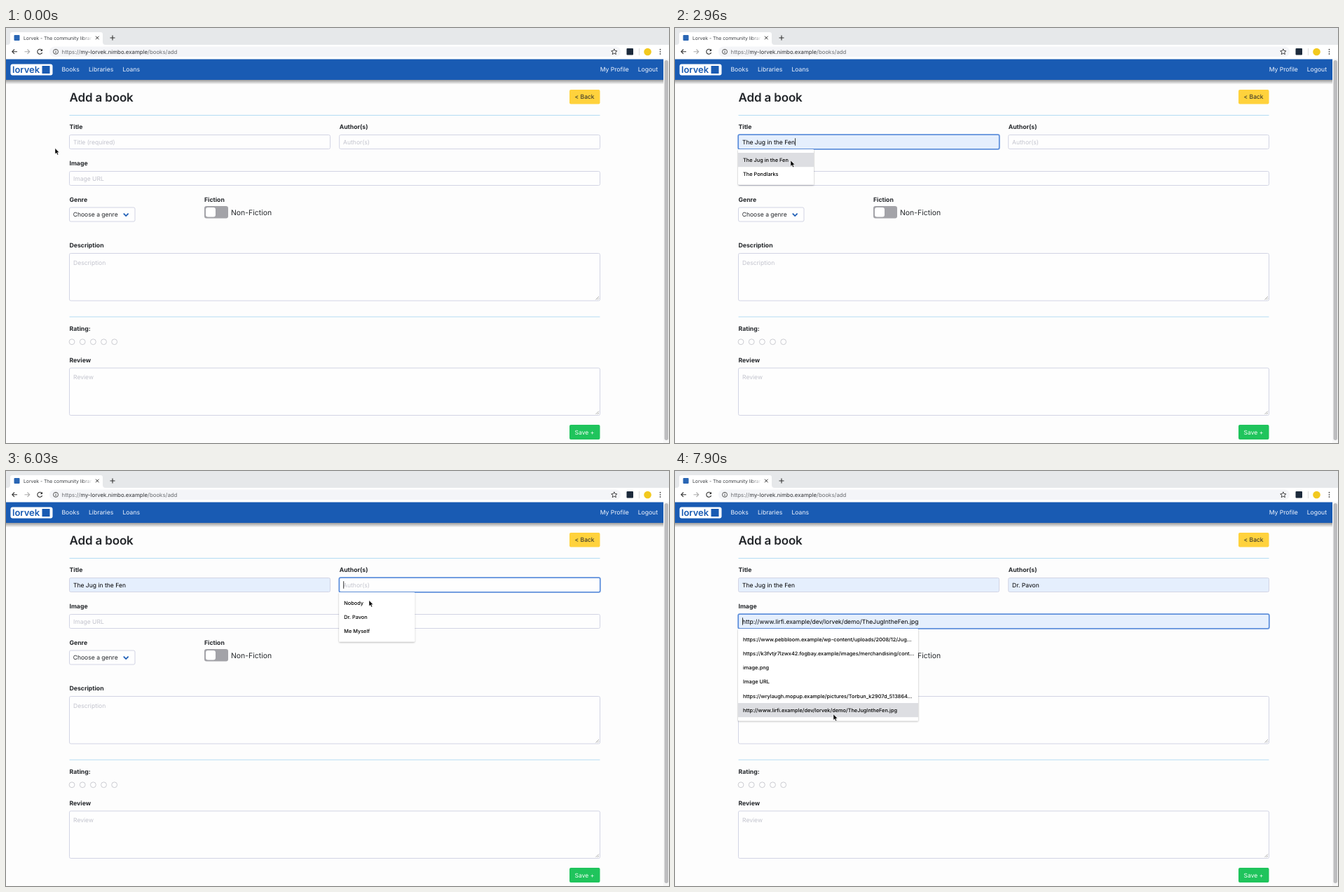
Recreate the animation shown at these times as an HTML page. Size 946 by 592 pixels, loop 8 s.

```html
<!DOCTYPE html>
<html lang="en">
<head>
<meta charset="utf-8">
<title>Add a book</title>
<style>
  html, body { margin: 0; width: 100%; height: 100%; overflow: hidden; background: #fdfdfd; }
  svg { display: block; width: 946px; height: 592px; }
  text { font-family: Inter, "Open Sans", sans-serif; text-rendering: geometricPrecision; white-space: pre; }
</style>
</head>
<body>
<svg id="stage" viewBox="0 0 946 592">
  <defs>
    <linearGradient id="fade"><stop offset="0" stop-color="#fff" stop-opacity="0"/><stop offset="1" stop-color="#fff"/></linearGradient>
    <linearGradient id="under" x2="0" y2="1"><stop offset="0" stop-opacity=".42"/><stop offset="1" stop-opacity="0"/></linearGradient>
    <filter id="lift" x="-10%" y="-10%" width="120%" height="125%">
      <feDropShadow dx="0" dy="1" stdDeviation="1.3" flood-opacity=".32"/>
    </filter>
  </defs>
  <g id="page"></g>
  <g id="live"></g>
</svg>
<script>
const LOOP = 8000;
const INK = '#24272b', HINT = '#c2c3cd', EDGE = '#d2d4e4', FOCUS = '#5f90dc', FILLED = '#e5effd', BLUE = '#195bb3';

const esc = s => s.replace(/&/g, '&amp;').replace(/</g, '&lt;');
const rect = (x, y, w, h, fill, r = 0, extra = '') =>
  `<rect x="${x}" y="${y}" width="${w}" height="${h}" rx="${r}" fill="${fill}" ${extra}/>`;
const text = (x, y, s, size = 8.55, fill = INK, weight = 400, extra = '') =>
  `<text x="${x}" y="${y}" font-size="${size}" fill="${fill}" font-weight="${weight}" ${extra}>${esc(s)}</text>`;
const path = (d, stroke, w = 1) => `<path d="${d}" fill="none" stroke="${stroke}" stroke-width="${w}"/>`;
const dot = (x, y, r, fill, extra = '') => `<circle cx="${x}" cy="${y}" r="${r}" fill="${fill}" ${extra}/>`;
const box = (x, y, w, h) => rect(x, y, w, h, '#fefefe', 2, `stroke="${EDGE}"`);
const label = (x, y, s) => text(x, y, s, 8.7, INK, 650);

function browser() {
  return rect(0, 0, 946, 24, '#e6e8ea') +
    '<path d="M2 24Q6 24 6 20V9Q6 6 9 6H135Q138 6 138 9V20Q138 24 142 24Z" fill="#fff"/>' +
    rect(11.5, 10, 8, 8, '#2a66b4', 1) +
    text(25, 16.6, 'Lorvek - The community librar', 6.8, '#3a3d41') + rect(108, 8, 16, 13, 'url(#fade)') +
    path('M128 11.7L132.6 16.3M132.6 11.7L128 16.3', '#333') +
    path('M148.5 14H155.5M152 10.5V17.5', '#333', 1.1) +
    rect(0, 24, 946, 20.5, '#fff') + rect(62, 26.5, 815, 14.5, '#f4f5f8', 7.2) +
    path('M16 33.7H9M12 30.5L8.8 33.7L12 36.9', '#333', 1.1) +
    path('M26.5 33.7H33.5M30.5 30.5L33.7 33.7L30.5 36.9', '#aaa', 1.1) +
    path('M51 31.5A3.5 3.5 0 1 0 51.6 35', '#333', 1.1) + '<path d="M52 29.8V33H48.8Z" fill="#333"/>' +
    dot(71, 33.8, 3.5, 'none', 'stroke="#444" stroke-width=".9"') + path('M71 33.2V35.9M71 31.6V32.5', '#444', .9) +
    '<text x="79.5" y="36.6" font-size="7.85" fill="#6a6d71">https://<tspan fill="#303236">my-lorvek.nimbo.example</tspan>/books/add</text>' +
    path('M867.8 29.8L869 32.5L871.9 32.8L869.7 34.7L870.4 37.6L867.8 36.1L865.2 37.6L865.9 34.7L863.7 32.8L866.6 32.5Z', '#333', .9) +
    rect(885.5, 29, 9.5, 9.5, '#1d2b3c', 1) + path('M903.5 29V39', '#ddd') +
    dot(915.5, 34, 5.3, '#f2c91f') +
    [30.7, 33.8, 36.9].map(y => dot(933.5, y, .9, '#444')).join('');
}

function page() {
  const links = [[79.5, 'Books'], [118, 'Libraries'], [166.5, 'Loans'], [847.7, 'My Profile'], [901.7, 'Logout']];
  const area = (y, hint) => box(90.5, y, 757, 67.5) + text(96, y + 16.2, hint, 8.55, HINT) +
    path(`M841.5 ${y + 66}L846 ${y + 61.5}M844 ${y + 66}L846 ${y + 64}`, '#888', .7);
  return rect(0, 44, 946, 548, '#fdfdfd') + browser() +
    rect(0, 73.5, 938, 7, 'url(#under)') + rect(0, 44.5, 938, 29.5, BLUE) +
    rect(938, 44, 8, 548, '#f7f7f7') + rect(939.5, 46, 5.5, 542, '#bdbdbf', 2.7) +
    rect(6.5, 51.5, 60, 16, '#fff', 3) + text(9, 63.5, 'lorvek', 13, BLUE, 600) + rect(51.5, 54, 11, 11, BLUE) +
    links.map(([x, s]) => text(x, 62.4, s, 8.6, '#f3f7ff')).join('') +
    text(90.5, 104.7, 'Add a book', 17, INK, 600, 'letter-spacing="-.15"') +
    rect(804, 88, 43.5, 20.5, '#ffd23c', 2) + text(811.5, 101.4, '< Back') +
    path('M90.5 124.5H847.5M90.5 412H847.5', '#b4dcf3') +
    label(90.5, 144.3, 'Title') + label(475.7, 144.3, 'Author(s)') + label(90.5, 196.2, 'Image') +
    label(90.5, 248.1, 'Genre') + label(283, 248.1, 'Fiction') + label(90.5, 313.4, 'Description') +
    label(90.5, 431.7, 'Rating:') + label(90.5, 477, 'Review') +
    box(90.5, 256, 93.5, 20) + text(95.7, 269.4, 'Choose a genre') + path('M167.8 264.6L171.2 268L174.6 264.6', '#1a5bb5', 1.7) +
    rect(283, 254, 34, 17.5, '#a3a3a8', 3) + rect(285, 256, 14, 13.5, '#fff', 3) + text(321, 266.8, 'Non-Fiction', 10.45) +
    area(321.5, 'Description') + area(485, 'Review') +
    [94, 109.2, 124.4, 139.5, 154.7].map(x => dot(x, 447.7, 3.9, '#fff', 'stroke="#c5c6cb" stroke-width=".9"')).join('') +
    rect(804, 566, 43.5, 21, '#1fc45c', 2) + text(811.5, 579.8, 'Save +', 8.55, '#f4fff8');
}

const BOOK = 'The Jug in the Fen', WRITER = 'Dr. Pavon';
const PICTURE = 'http://www.lirfi.example/dev/lorvek/demo/TheJugIntheFen.jpg';

// Each list holds [start time, value] steps.
const fields = [
  { x: 90.5, y: 152.5, w: 372, hint: 'Title (required)', on: 900, off: 4750,
    value: [[0, ''], [1420, 'T'], [1560, 'Th'], [1700, 'The'], [1840, 'The '], [2620, BOOK]], filled: 2620,
    menu: { w: 108, open: 1500, close: 3310, items: [BOOK, 'The Pondlarks'], hover: [[0, -1], [2580, 0]] } },
  { x: 475.7, y: 152.5, w: 371.8, hint: 'Author(s)', on: 4750, off: 7130,
    value: [[0, ''], [6200, WRITER]], filled: 6200,
    menu: { w: 108, open: 5150, close: 6500, items: ['Nobody', WRITER, 'Me Myself'], hover: [[0, -1], [6060, 0], [6160, 1]] } },
  { x: 90.5, y: 204.5, w: 757, hint: 'Image URL', on: 7130, off: LOOP,
    value: [[0, ''], [7450, 'image.png'], [7510, 'Image URL'], [7620, PICTURE]], filled: 7450,
    menu: { w: 257, open: 7300, close: LOOP, hover: [[0, -1], [7400, 1], [7430, 2], [7465, 3], [7530, 4], [7580, 5]],
      items: ['https://www.pebbloom.example/wp-content/uploads/2008/12/Jug...',
        'https://k3fvtjr7lzwx42.fogbay.example/images/merchandising/cont...',
        'image.png', 'Image URL',
        'https://wrylaugh.mopup.example/pictures/Torbun_k2907d_513864...', PICTURE] } }
];
// Moments at which the caret blink starts over.
const blinks = [900, 1420, 1560, 1700, 1840, 2620, 3310, 4750, 6500, 7130, 7620].map(t => [t, t]);
// Pointer stops: time, x, y.
const stops = [[0, 70, 171.5], [350, 70, 171.5], [850, 152, 163], [2300, 152, 163], [2600, 165, 187], [3200, 165, 190],
  [4080, 165, 190], [4700, 518, 164], [5870, 519, 165], [6030, 518, 184.5], [6200, 508, 206.5], [6830, 508, 207],
  [7080, 262, 213], [7340, 258, 216], [7480, 251, 319], [7620, 232, 345], [7900, 226, 347]];

const at = (steps, t) => steps.reduce((v, [s, n]) => t >= s ? n : v, steps[0][1]);

function pointer(t) {
  const i = stops.findIndex(s => s[0] > t);
  if (i < 0) return stops[stops.length - 1].slice(1);
  const [a, b] = [stops[i - 1], stops[i]];
  const u = (t - a[0]) / (b[0] - a[0]), k = u * u * (3 - 2 * u);
  return [a[1] + (b[1] - a[1]) * k, a[2] + (b[2] - a[2]) * k];
}

const isOpen = (m, t) => t >= m.open && t < m.close;

function field(f, t) {
  const active = t >= f.on && t < f.off, filled = t >= f.filled, value = at(f.value, t);
  const grow = active ? .3 : 0;
  return rect(f.x - grow, f.y - grow, f.w + 2 * grow, 20 + 2 * grow, filled ? FILLED : '#fefefe', 2,
    `stroke="${active ? FOCUS : EDGE}" stroke-width="${active ? 1.8 : 1}"`) +
    text(f.x + 5.4, f.y + 13.1, value || f.hint, 8.55, filled ? '#000' : value ? INK : HINT);
}

function menu(f, t) {
  const m = f.menu;
  if (!isOpen(m, t)) return '';
  const top = f.y + 20.5, x = f.x - .5, row = i => top + 5 + i * 20.2, h = m.items.length * 20.2 + 10, pick = at(m.hover, t);
  return rect(x, top, m.w, h, '#fff', 1, 'filter="url(#lift)"') +
    (pick < 0 ? '' : rect(x, row(pick), m.w, 20.2, '#dddee2')) +
    m.items.map((s, i) => text(x + 7, row(i) + 12.7, s, 7.35, '#000', 500)).join('');
}

const pen = document.createElement('canvas').getContext('2d');
function width(s) {
  pen.font = '400 85.5px Inter, "Open Sans", sans-serif';
  return pen.measureText(s).width / 10;
}

function caret(t) {
  const f = fields.find(f => t >= f.on && t < f.off);
  if (!f || (t - at(blinks, t)) % 1060 >= 530) return '';
  // While a suggestion is previewed in an empty field, the caret stays at its start.
  const preview = isOpen(f.menu, t) && f !== fields[0];
  const s = preview ? '' : at(f.value, t);
  return rect(f.x + 5.6 + width(s), f.y + 4.7, .9, 10.6, '#222');
}

function cursor(t) {
  if (t >= 1420 && t < 2300) return '';
  const [x, y] = pointer(t);
  const inside = f => x > f.x && x < f.x + f.w && y > f.y && y < f.y + 20;
  const covered = fields.some(f => isOpen(f.menu, t) && y > f.y + 20);
  const resting = t >= 6500 && t < 6830;
  if (fields.some(inside) && !covered && !resting) {
    const bend = (sx, sy) => `M${x + sx * 1.8} ${y + sy * 4.5}Q${x} ${y + sy * 4.5} ${x} ${y + sy * 3}`;
    return path(bend(-1, -1) + bend(1, -1) + bend(-1, 1) + bend(1, 1) + `M${x} ${y - 3}V${y + 3}`, '#222', .8);
  }
  return `<path transform="translate(${x} ${y})" d="M0 0V8.3L1.9 6.6L3.2 9.6L4.7 9L3.4 6.1H5.9Z" fill="#000" stroke="#fff" stroke-width=".5"/>`;
}

const live = document.getElementById('live');
let last = '';
function draw(t) {
  const s = fields.map(f => field(f, t)).join('') + caret(t) + fields.map(f => menu(f, t)).join('') + cursor(t);
  if (s !== last) live.innerHTML = last = s;
}

document.getElementById('page').innerHTML = page();
const start = performance.now();
function tick() {
  draw((performance.now() - start) % LOOP);
  requestAnimationFrame(tick);
}
tick();
</script>
</body>
</html>
```
